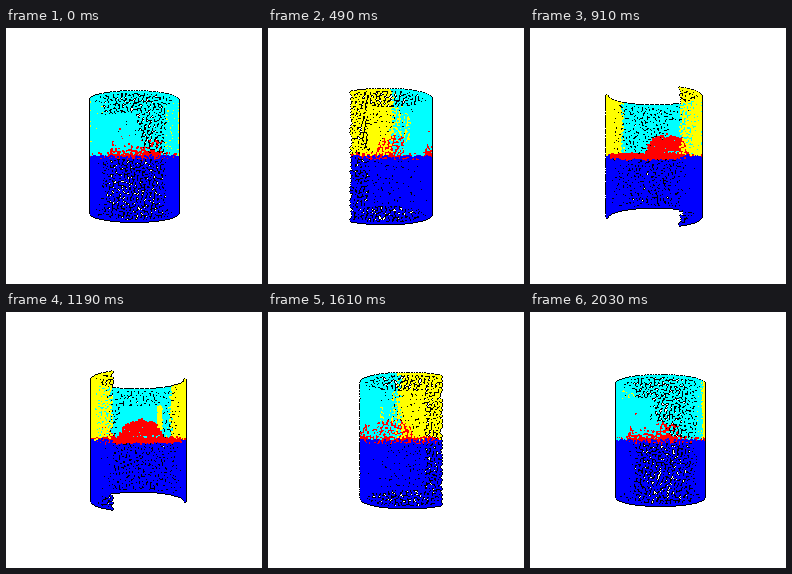
A matplotlib script for the animation above (2.1 s loop, 256 by 256 pixels).

```python
import numpy as np
import matplotlib.pyplot as plt
from matplotlib.animation import FuncAnimation

SIZE, FRAMES, INTERVAL = 256, 30, 70
CAMERA = 280.0       # eye distance, also focal length in pixels
RADIUS, SHIFT = 44.6, 10.0
HALF_H = 56.5
GAP = 54             # half angle of the opening, degrees

CYAN, YELLOW, RED, BLUE = (0, 255, 255), (255, 255, 0), (255, 0, 0), (0, 0, 255)
rng = np.random.default_rng(7)


def on_tube(phi, radius):
    """Body coordinates (p along the opening, q sideways) of tube points."""
    a = np.radians(phi)
    return SHIFT + radius * np.cos(a), radius * np.sin(a)


def paint(n, color):
    return np.tile(np.array(color, np.uint8), (n, 1))


def spread(n):
    """Evenly scattered points in the unit square."""
    k = np.arange(n)
    return k * 0.7548776662 % 1, k * 0.5698402910 % 1


def wall(n, rim):
    s, t = spread(n)
    phi = GAP + (360 - 2 * GAP) * s + rng.normal(0, 0.6, n)
    y = HALF_H * (2 * t - 1) + rng.normal(0, 0.45, n)
    edge = np.linspace(GAP, 360 - GAP, rim)
    phi = np.clip(np.concatenate([phi, edge, edge]), GAP, 360 - GAP)
    y = np.concatenate([y, np.full(rim, HALF_H), np.full(rim, -HALF_H)])
    y = np.clip(y, -HALF_H, HALF_H)
    n = len(y)
    p, q = on_tube(phi, RADIUS)
    away = np.abs(phi - 180)
    col = paint(n, CYAN)
    col[away + rng.normal(0, 2.5, n) > 75] = YELLOW
    chance = np.where(away < 33, 2.2 * np.exp(-y / 4.5), 0.35 * (y < 3))
    col[rng.random(n) < chance] = RED
    col[y < 0.8 + rng.normal(0, 0.4, n)] = BLUE
    return p, q, y, col


def panel(n):
    """Dense patch with a slanted side, just inside the wall."""
    s, t = spread(n)
    y = 2 + 36 * t
    phi = 119 + s * (72 - 10 * t)
    p, q = on_tube(phi, RADIUS - 1.5)
    col = paint(n, CYAN)
    col[(phi < 126) & (y > 12)] = YELLOW
    return p, q, y, col


def disc(n):
    r = 42 * np.sqrt(rng.random(n))
    p, q = on_tube(rng.uniform(0, 360, n), r)
    y = rng.normal(0.3, 1.1, n)
    keep = p < SHIFT + RADIUS * np.cos(np.radians(GAP)) - 2
    return p[keep], q[keep], y[keep], paint(keep.sum(), RED)


def mound(n):
    r = np.sqrt(rng.random(n))
    a = rng.uniform(0, 2 * np.pi, n)
    y = 22 * (1 - r ** 2) ** 0.4 * rng.uniform(0.4, 1, n)
    return -3.7 + 22 * r * np.cos(a), 9 + 22 * r * np.sin(a), y, paint(n, RED)


parts = [wall(5500, 140), panel(900), disc(1100), mound(560)]
P, Q, Y, COLOR = (np.concatenate(c) for c in zip(*parts))

DOT = [(0, 0), (1, 0), (0, 1), (1, 1)]
SHADE = [(0, -1), (1, 2), (-1, 0), (2, 1), (2, 0), (0, 2)]


def render(i):
    a = 2 * np.pi * i / FRAMES
    x = -(P * np.sin(a) + Q * np.cos(a))
    z = P * np.cos(a) - Q * np.sin(a)
    scale = CAMERA / (CAMERA + z)
    u = np.floor(127.8 + x * scale).astype(int)
    v = np.floor(128.0 - Y * scale).astype(int)
    order = np.argsort(-z)
    u, v, col = u[order], v[order], COLOR[order]
    img = np.full((SIZE, SIZE, 3), 255, np.uint8)
    for dx, dy in SHADE:
        img[v + dy, u + dx] = 0
    # all four pixels of a point stay together in depth order
    uu = np.stack([u + dx for dx, _ in DOT], 1).ravel()
    vv = np.stack([v + dy for _, dy in DOT], 1).ravel()
    img[vv, uu] = np.repeat(col, len(DOT), axis=0)
    return img


fig = plt.figure(figsize=(SIZE / 100, SIZE / 100), dpi=100, facecolor="white")
ax = fig.add_axes([0, 0, 1, 1])
ax.axis("off")
view = ax.imshow(render(0), interpolation="nearest", aspect="auto")


def update(i):
    view.set_data(render(i))
    return (view,)


anim = FuncAnimation(fig, update, frames=FRAMES, interval=INTERVAL,
                     repeat=True, repeat_delay=0, blit=False)
plt.show()
```
